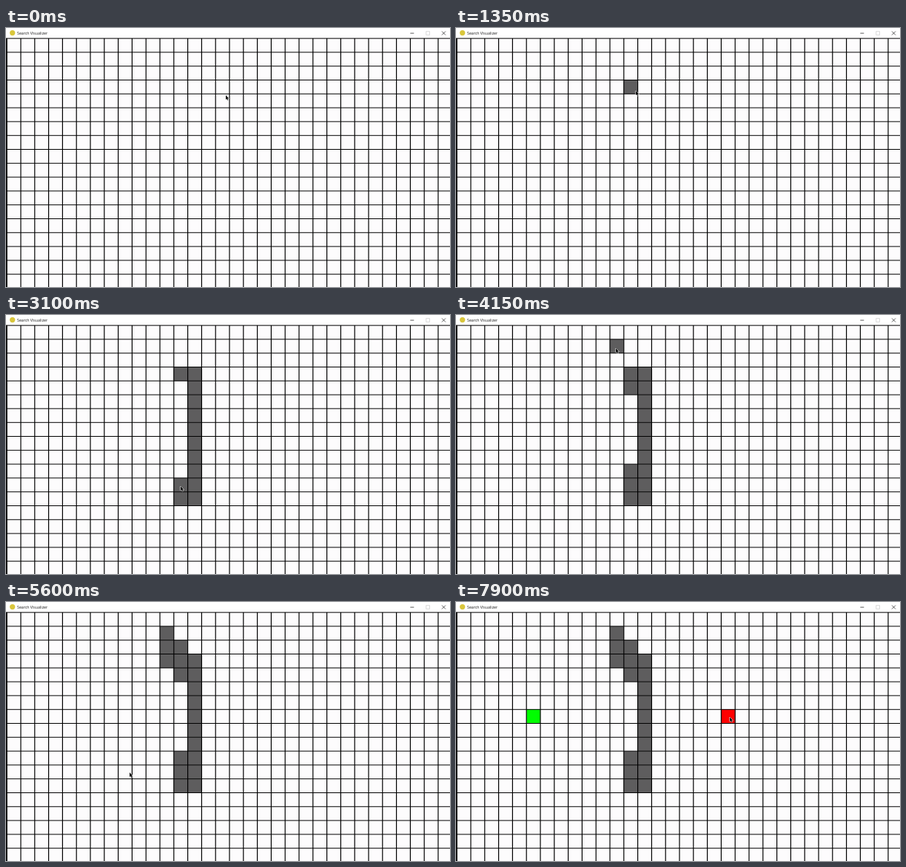
An HTML page with a canvas that plays this animation: 600 px wide and 351 px high, repeating every 8000 ms.

```html
<!DOCTYPE html>
<html lang="en">
<head>
<meta charset="utf-8">
<title>Search Visualizer</title>
<style>
html, body { margin: 0; width: 100%; height: 100%; overflow: hidden; background: #fff; }
canvas { display: block; width: 600px; height: 351px; }
</style>
</head>
<body>
<canvas id="stage" width="600" height="351"></canvas>
<script>
const ctx = document.getElementById('stage').getContext('2d');
const W = 600, H = 351, LOOP = 8000, TICK = 50;
const LEFT = 1.2, TOP = 14.1, CELL = 18.8;
const WALL = '#5e5d5e', START = '#00fe00', GOAL = '#fe0000';

// Pointer key points: time, x, y
const path = [
  [0, 297, 91], [800, 238, 80], [1350, 243, 85], [1850, 257, 98],
  [2200, 262, 182], [2650, 255, 248], [2850, 238, 248], [3100, 236, 232],
  [3300, 235, 206], [3550, 234, 84], [3700, 234, 97], [4050, 218, 42],
  [4150, 216, 45], [4400, 217, 54], [4550, 241, 58], [4950, 241, 58],
  [5200, 222, 82], [5450, 184, 242], [5600, 167, 231], [6300, 103, 144],
  [6450, 102, 157], [7050, 102, 157], [7400, 370, 156], [LOOP, 370, 156]
];

// Mouse button held: from, to, paint colour
const drags = [
  [750, 3300, WALL], [3600, 3700, WALL], [4050, 4550, WALL], [5190, 5200, WALL],
  [6850, 6860, START], [7850, 7860, GOAL]
];

function pointerAt(t) {
  const i = path.findIndex(p => p[0] > t);
  const [t0, x0, y0] = path[i - 1], [t1, x1, y1] = path[i];
  const k = (t - t0) / (t1 - t0);
  return [x0 + (x1 - x0) * k, y0 + (y1 - y0) * k];
}

// Every cell the pointer crosses during a drag is painted once.
function paintCells() {
  const cells = new Map();
  for (const [from, to, color] of drags) {
    for (let t = from; t <= to; t += 10) {
      const [x, y] = pointerAt(t);
      const col = Math.floor((x - LEFT) / CELL), row = Math.floor((y - TOP) / CELL);
      const key = col + ',' + row;
      if (!cells.has(key)) cells.set(key, { col, row, t, color });
    }
  }
  return [...cells.values()];
}
const cells = paintCells();

function line(x0, y0, x1, y1) {
  ctx.beginPath();
  ctx.moveTo(x0, y0);
  ctx.lineTo(x1, y1);
  ctx.stroke();
}

function drawTitleBar() {
  ctx.fillStyle = '#fff';
  ctx.fillRect(0, 0, W, TOP);
  ctx.fillStyle = '#d9c63c';
  ctx.beginPath();
  ctx.arc(8.7, 6.6, 3.6, 0, Math.PI * 2);
  ctx.fill();
  ctx.fillStyle = '#1c1c1c';
  ctx.font = '5.25px "Open Sans", sans-serif';
  ctx.fillText('Search Visualizer', 15, 9);
  ctx.strokeStyle = '#333';
  ctx.lineWidth = 0.8;
  line(546.3, 7.1, 551.3, 7.1);
  line(589, 4.5, 594, 9.5);
  line(594, 4.5, 589, 9.5);
  ctx.strokeStyle = '#d0d0d0';
  ctx.strokeRect(567.8, 4.7, 4.6, 4.6);
}

function drawGrid(t) {
  ctx.fillStyle = '#fdfcfd';
  ctx.fillRect(0, TOP, W, H);
  for (const c of cells) {
    if (t < c.t) continue;
    ctx.fillStyle = c.color;
    ctx.fillRect(LEFT + c.col * CELL, TOP + c.row * CELL, CELL, CELL);
  }
  ctx.fillStyle = ctx.strokeStyle = '#000';
  ctx.fillRect(0, TOP, LEFT, H);
  ctx.lineWidth = 1.2;
  for (let x = LEFT; x < W; x += CELL) line(x, TOP, x, H);
  ctx.lineWidth = 1;
  for (let y = TOP; y < H; y += CELL) line(0, y, W, y);
}

const arrow = new Path2D('M0 0V6L1.4 4.9L2.4 7L3.3 6.6L2.4 4.5L4.2 4.4Z');

function drawPointer(x, y) {
  ctx.save();
  ctx.translate(x, y);
  ctx.strokeStyle = '#fff';
  ctx.lineWidth = 1;
  ctx.stroke(arrow);
  ctx.fillStyle = '#050505';
  ctx.fill(arrow);
  ctx.restore();
}

function draw(now) {
  const t = Math.floor((now % LOOP) / TICK) * TICK;
  drawTitleBar();
  drawGrid(t);
  drawPointer(...pointerAt(t));
}

const begin = performance.now();
function loop() {
  draw(performance.now() - begin);
  requestAnimationFrame(loop);
}
loop();
</script>
</body>
</html>
```
